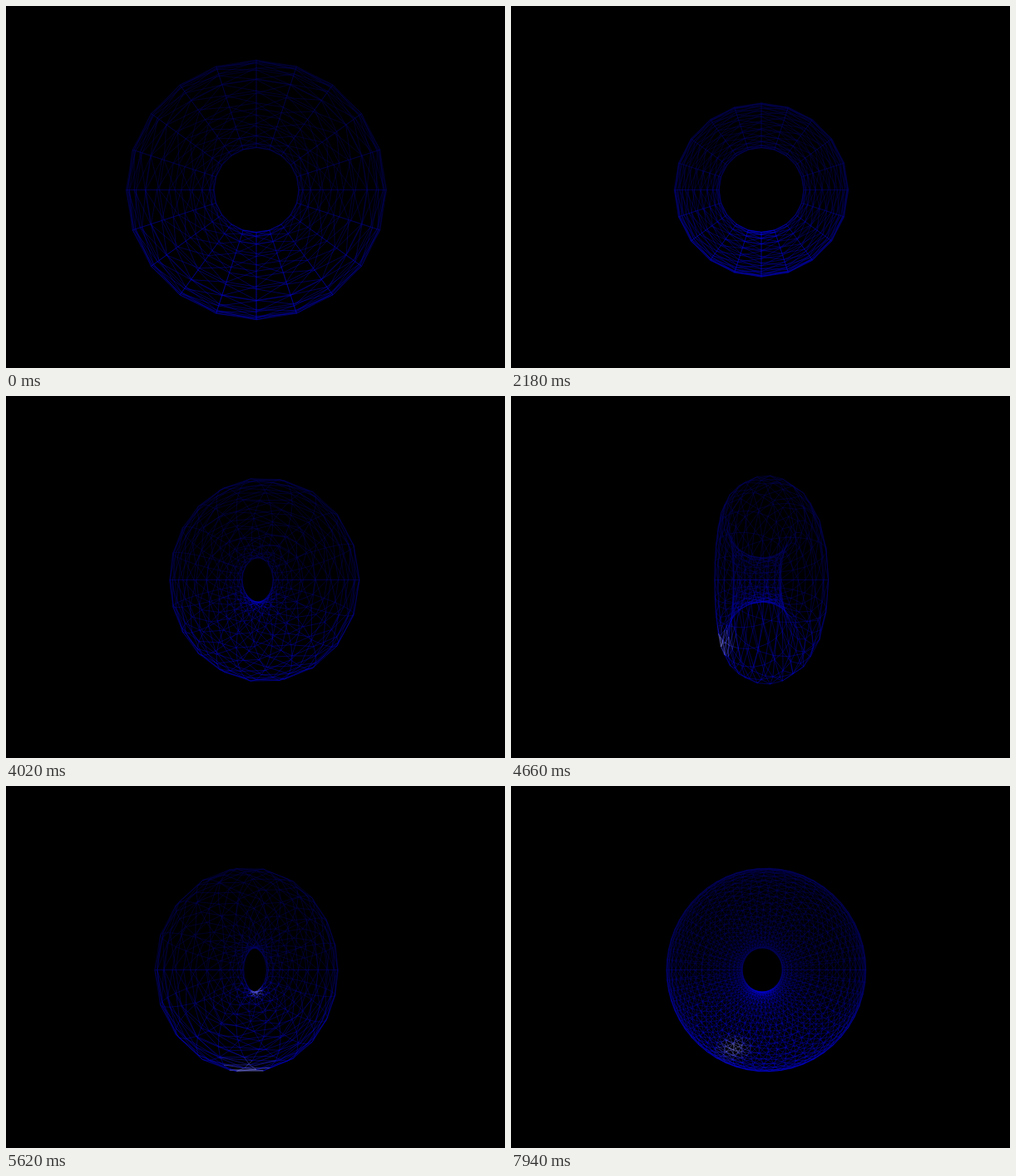
An HTML page with a canvas for the animation above (8000 ms loop, 600 px wide and 436 px high).

```html
<!DOCTYPE html>
<html lang="en">
<head>
<meta charset="utf-8">
<title>Wireframe torus</title>
<style>
  html, body { margin: 0; width: 100%; height: 100%; overflow: hidden; background: #000; }
  canvas { display: block; }
</style>
</head>
<body>
<canvas id="stage" width="600" height="436"></canvas>
<script>
const ctx = document.getElementById('stage').getContext('2d');
const LOOP = 8000, STEP = 80;
const CX = 301, CY = 221.5, FOCAL = 400, DISTANCE = 3.93;

const clamp = (x, low, high) => Math.min(high, Math.max(low, x));
const smooth = x => {
  x = clamp(x, 0, 1);
  return x * x * (3 - 2 * x);
};
const blob = (dx, dy, size) => Math.exp(-(dx * dx + dy * dy) / (2 * size * size));

// The shape and view change in equal steps, each move being a run of them.
function stateAt(t) {
  const ticks = (start, count) => clamp(Math.floor((t - start) / STEP) + 1, 0, count);
  return {
    radius: 1 - 0.04 * (ticks(1460, 1) + ticks(1860, 5) + ticks(2420, 1)),
    tube: 0.5 - 0.04 * ticks(500, 1) + 0.05 * (ticks(2820, 4) - ticks(900, 4)),
    angle: 4 * ticks(3380, 1) + 5.9 * ticks(3780, 24) + 3.5 * ticks(5700, 7)
      + 1.65 * ticks(7140, 6) + 5 * ticks(7780, 3),
    tubular: 20 + 15 * ticks(6340, 2) + 2 * ticks(6500, 3),
    radial: 20 + 5 * ticks(6340, 2) + ticks(7140, 6)
  };
}

// The highlight is lowest at 150 degrees and climbs the left side either way.
function makeShader({ radius, tube, angle }) {
  const extent = FOCAL * (radius + tube) / DISTANCE;
  const hole = FOCAL * (radius - tube) / DISTANCE;
  const away = Math.abs(angle - 150) / 45;
  const glintX = -8 - 25 * away, glintY = 121 - 27 * away;
  const power = smooth((angle - 60) / 14) * 0.65;
  const inner = power * Math.max(0, 1 - away);

  return (x, y) => {
    const lit = smooth((y / extent - 0.08 * x / extent + 0.2) / 1.1);
    const lip = blob(x / 1.6, y - hole, 9);
    const white = power * blob(x - glintX, (y - glintY) * 1.4, 11) + inner * blob(x, y - hole, 4);
    const grey = Math.round(Math.min(1, white) * 220);
    const blue = Math.round(Math.min(255, 105 + 110 * lit + 70 * lip + 140 * white));
    return `rgb(${grey},${grey},${blue})`;
  };
}

function drawTorus(state) {
  const { radius, tube, angle, tubular, radial } = state;
  const cos = Math.cos(angle * Math.PI / 180), sin = Math.sin(angle * Math.PI / 180);
  const shade = makeShader(state);

  const vertex = (j, i) => {
    const v = j / radial * Math.PI * 2, u = i / tubular * Math.PI * 2;
    const ring = radius + tube * Math.cos(v), z = tube * Math.sin(v);
    const x = ring * Math.cos(u), y = ring * Math.sin(u);
    const scale = FOCAL / (DISTANCE - x * sin - z * cos);
    return [(x * cos - z * sin) * scale, -y * scale];
  };
  const line = (a, b) => {
    ctx.strokeStyle = shade((a[0] + b[0]) / 2, (a[1] + b[1]) / 2);
    ctx.beginPath();
    ctx.moveTo(...a);
    ctx.lineTo(...b);
    ctx.stroke();
  };

  ctx.setTransform(1, 0, 0, 1, 0, 0);
  ctx.globalAlpha = 1;
  ctx.fillStyle = '#000';
  ctx.fillRect(0, 0, 600, 436);
  ctx.translate(CX, CY);
  ctx.lineWidth = 0.7;
  ctx.globalAlpha = 0.6;
  for (let j = 1; j <= radial; j++) {
    for (let i = 1; i <= tubular; i++) {
      const corner = vertex(j, i);
      line(corner, vertex(j, i - 1));
      line(corner, vertex(j - 1, i));
      line(corner, vertex(j - 1, i - 1));
    }
  }
}

let shown = '';
function frame(now) {
  const state = stateAt(now % LOOP);
  const key = Object.values(state).join();
  if (key !== shown) {
    drawTorus(state);
    shown = key;
  }
  requestAnimationFrame(frame);
}
frame(performance.now());
</script>
</body>
</html>
```
